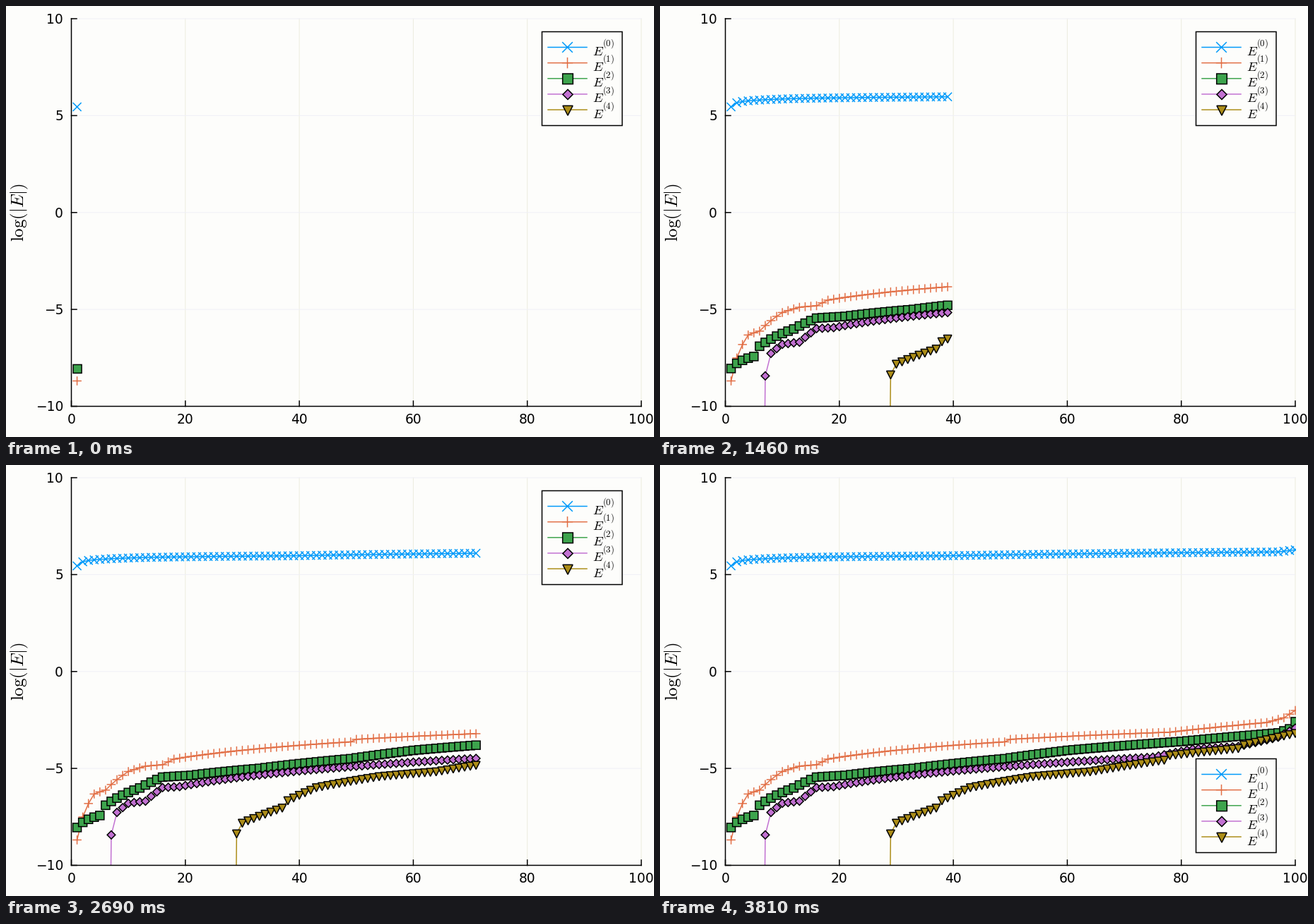
Write a matplotlib script that moves like this. It is 917 by 611 pixels and loops after 3.85 s.

```python
import numpy as np
import matplotlib.pyplot as plt
from matplotlib.animation import FuncAnimation
from matplotlib.collections import PathCollection
from matplotlib.patches import Rectangle
from matplotlib.path import Path
from matplotlib.transforms import Affine2D

W, H, DPI = 917, 611, 64
PT = 72 / DPI                      # points per pixel
LEFT, RIGHT, TOP, BOTTOM = 92.5, 899.0, 18.0, 567.5
TICK_MS, TICKS = 10, 385
STEPS, FPS = 100, 26
BG = "#fdfdfb"
STROKE = 1.5
LEGEND_SCALE = 1.22

n_all = np.arange(1, STEPS + 1)
starts = np.round((n_all - 1) * 1000 / FPS / TICK_MS)


def px(x):
    return LEFT + np.asarray(x) * (RIGHT - LEFT) / 100


def py(y):
    return BOTTOM - (np.asarray(y) + 10) * (BOTTOM - TOP) / 20


def curve(*knots):
    """Growth that is straight in log(n) between knots, far below before."""
    n, v = np.transpose(knots)
    return np.interp(np.log(n_all), np.log(n), v, left=-37)


def polygon(*pts):
    return Path([*pts, pts[0]], closed=True)


def strokes(a, b, c, d):
    return Path([a, b, c, d], [Path.MOVETO, Path.LINETO] * 2)


CROSS = strokes((-1, -1), (1, 1), (-1, 1), (1, -1))
PLUS = strokes((-1, 0), (1, 0), (0, -1), (0, 1))
SQUARE = polygon((-1, -1), (1, -1), (1, 1), (-1, 1))
DIAMOND = polygon((0, -1), (1, 0), (0, 1), (-1, 0))
TRIANGLE = polygon((-1, -0.88), (1, -0.88), (0, 1.07))

# values, colour, marker, half size, outline
SERIES = [
    (curve((1, 5.45), (2, 5.66), (3, 5.73), (7, 5.82), (14, 5.89),
           (39, 5.97), (97, 6.17), (100, 6.28)),
     "#009afa", CROSS, 6, None),
    (curve((1, -8.69), (4, -6.32), (6, -6.12), (10, -5.16), (13, -4.89),
           (16, -4.81), (18, -4.52), (49, -3.63), (50, -3.5), (78, -3.13),
           (95, -2.63), (98, -2.39), (100, -2.01)),
     "#e26f46", PLUS, 6.3, None),
    (curve((1, -8.05), (5, -7.43), (6, -6.9), (12, -6.01), (16, -5.45),
           (21, -5.36), (33, -5), (49, -4.5), (60, -4.07), (80, -3.61),
           (97, -3.17), (99, -2.96), (100, -2.59)),
     "#3da44d", SQUARE, 6, "black"),
    (curve((7, -8.43), (8, -7.27), (10, -6.8), (13, -6.69), (16, -5.99),
           (19, -5.94), (31, -5.41), (50, -4.89), (75, -4.42), (82, -4.0),
           (90, -3.87), (97, -3.39), (100, -2.92)),
     "#c271d2", DIAMOND, 5.8, "black"),
    (curve((29, -8.36), (30, -7.81), (37, -7.03), (38, -6.65), (43, -5.98),
           (54, -5.41), (64, -5.16), (77, -4.56), (78, -4.32), (90, -3.96),
           (91, -3.78), (100, -3.18)),
     "#ac8d18", TRIANGLE, 5.8, "black"),
]

fig = plt.figure(figsize=(W / DPI, H / DPI), dpi=DPI, facecolor=BG)
ax = fig.add_axes([0, 0, 1, 1])
ax.set_xlim(0, W)
ax.set_ylim(H, 0)
ax.axis("off")


def rule(xs, ys, color="black", width=STROKE, z=1, **kw):
    return ax.plot(xs, ys, color=color, lw=width * PT, zorder=z, snap=False,
                   **kw)[0]


def label(x, y, s, size, **kw):
    return ax.text(x, y, s, fontsize=size * PT, **kw)


def place(shape, size, xs, ys):
    return [Path(shape.vertices * size + (x, y), shape.codes)
            for x, y in zip(xs, ys)]


def markers(paths, color, edge, z, transform):
    group = PathCollection(paths, facecolor=color if edge else "none",
                           edgecolor=edge or color, linewidth=STROKE * PT,
                           joinstyle="miter", zorder=z, transform=transform)
    group.set_snap(False)
    ax.add_collection(group, autolim=False)
    return group


# Grid, axes and tick labels
for v in range(20, 101, 20):
    rule([px(v)] * 2, [TOP, BOTTOM], "#ededdf", 1, 0)
for v in range(-5, 11, 5):
    rule([LEFT, RIGHT], [py(v)] * 2, "#f0f0f7", 1, 0)
rule([LEFT, LEFT, RIGHT], [TOP, BOTTOM, BOTTOM], z=9,
     solid_capstyle="projecting")
for v in range(0, 101, 20):
    rule([px(v)] * 2, [BOTTOM, BOTTOM - 7.5], z=9)
    label(px(v), 592, str(v), 18.6, ha="center", va="baseline",
          family="DejaVu Sans")
for v in range(-10, 11, 5):
    rule([LEFT, LEFT + 7.5], [py(v)] * 2, z=9)
    label(81, py(v) + 7, str(v).replace("-", "\u2212"), 18.6, ha="right",
          va="baseline", family="DejaVu Sans")
label(19.6, 292.5, r"$\mathrm{log}(|E|)$", 25, rotation=90, ha="center",
      va="center", math_fontfamily="cm")

# Data lines with their markers
plot_box = Rectangle((LEFT - 1, TOP - 1), RIGHT - LEFT + 2, BOTTOM - TOP + 1,
                     transform=ax.transData)
drawn = []
for i, (vals, color, shape, size, edge) in enumerate(SERIES):
    xs, ys = px(n_all), py(vals)
    paths = place(shape, size, xs, ys)
    line = rule([], [], color, z=2 + i)
    group = markers(paths[:1], color, edge, 2.5 + i, ax.transData)
    for artist in (line, group):
        artist.set_clip_path(plot_box)
    drawn.append((line, group, xs, ys, paths))

# Legend, moved as one block by `shift`
shift = Affine2D()
moved = shift + ax.transData
ax.add_patch(Rectangle((758.5, 36.5), 113.5, 133, facecolor=BG,
                       edgecolor="black", lw=STROKE * PT, zorder=10,
                       snap=False, transform=moved))
for i, (_, color, shape, size, edge) in enumerate(SERIES):
    y = 58.5 + 22.15 * i
    rule([767, 822], [y, y], color, z=11, transform=moved)
    markers(place(shape, size * LEGEND_SCALE, [794.5], [y]), color, edge, 12,
            moved)
    label(830.5, y + 11.5, "$E$", 18.5, zorder=12, transform=moved,
          math_fontfamily="cm")
    label(844.3, y - 1.6, f"$({i})$", 12.7, zorder=12, transform=moved,
          math_fontfamily="cm")


def update(tick):
    n = int(np.count_nonzero(starts <= tick))
    for line, group, xs, ys, paths in drawn:
        line.set_data(xs[:n], ys[:n])
        group.set_paths(paths[:n])
    # the legend leaves the top corner once the curve gets below it
    shift.clear().translate(0, 380 if n >= 75 else 0)
    return [artist for row in drawn for artist in row[:2]]


anim = FuncAnimation(fig, update, frames=TICKS, interval=TICK_MS,
                     init_func=lambda: update(0), repeat=True, repeat_delay=0)
plt.show()
```
